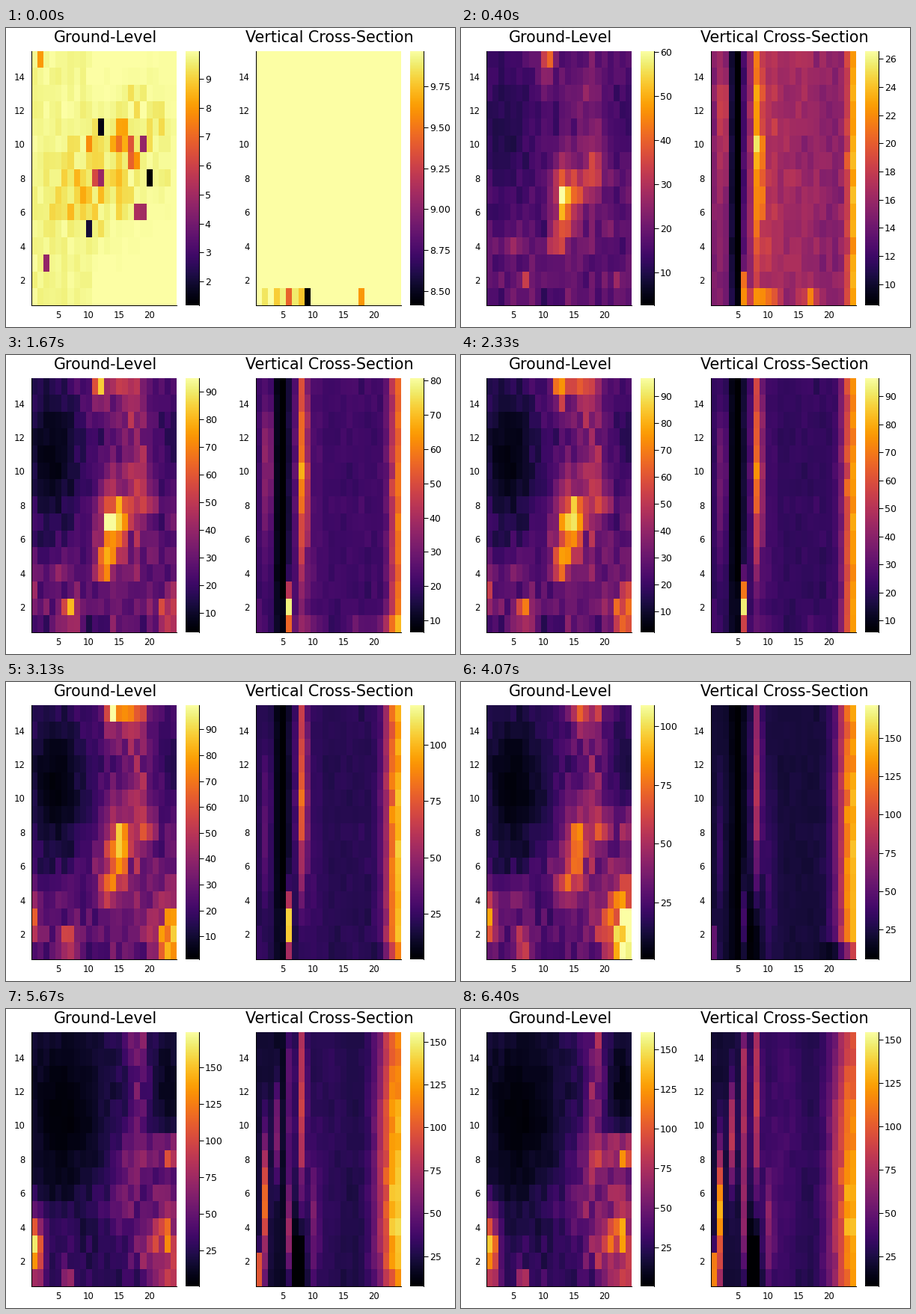
Write a matplotlib script that moves like this. It is 600 by 400 pixels and loops after 6470 ms.

```python
import numpy as np
import matplotlib.pyplot as plt
from matplotlib.animation import FuncAnimation

FRAMES, LOOP = 97, 6470
W, H = 600, 400
COLS, ROWS = 24, 15
KEYS = (13, 25, 47, 61, 74.5, 96)  # moments at which plume strengths are set
SPIN_UP = KEYS[0]

plt.rcParams["font.family"] = "DejaVu Sans"
gx, gy = np.meshgrid(np.arange(1, COLS + 1), np.arange(1, ROWS + 1))
rng = np.random.default_rng(4)


def plume(amps, start, end=None):
    """Gaussian (x, y, width, height) drifting from start to end."""
    start = np.array(start, float)
    end = start if end is None else np.array(end, float)

    def at(i):
        u = np.clip((i - KEYS[0]) / (KEYS[-1] - KEYS[0]), 0, 1)
        x, y, w, h = start + (end - start) * u
        return np.interp(i, KEYS, amps) * np.exp(-((gx - x) / w) ** 2 - ((gy - y) / h) ** 2)

    return at


def calm_ground():
    """Near-uniform start with a depleted band and a few sinks."""
    band = np.exp(-((gx - 14) / 8) ** 2 - ((gy - 6 - 0.2 * gx) / 2.6) ** 2)
    field = 9.95 - 1.3 * band * rng.gamma(1.5, 0.7, gx.shape)
    field -= 0.35 * rng.random(gx.shape) * (gx < 11)
    for x, y, v in ((12, 11, 1.5), (10, 5, 2), (20, 8, 1.2), (3, 3, 4.7),
                    (19, 10, 4.7), (18, 6, 5.2), (19, 6, 5), (11, 8, 6.2), (2, 15, 8)):
        field[y - 1, x - 1] = v
    return field


def calm_section():
    field = np.full(gx.shape, 9.967)
    for x, v in ((2, 9.86), (4, 9.78), (5, 9.9), (6, 9.42), (7, 9.88), (8, 9.76), (9, 8.41), (18, 9.61)):
        field[0, x - 1] = v
    return field


class Track:
    """Plumes on a flat background, growing out of a calm start."""

    def __init__(self, calm, base, grain, lows, highs, plumes):
        self.calm, self.base, self.grain = calm, base, grain
        self.lows, self.highs, self.plumes = lows, highs, plumes
        self.noise = rng.normal(0, 1, (2, ROWS, COLS))

    def at(self, i):
        times = (0,) + KEYS
        lo, hi = np.interp(i, times, self.lows), np.interp(i, times, self.highs)
        a = i / 40
        grain = self.grain * (np.cos(a) * self.noise[0] + np.sin(a) * self.noise[1])
        field = (self.base + sum(p(i) for p in self.plumes)) * np.exp(grain)
        u = min(i / SPIN_UP, 1)
        return np.clip(self.calm * (1 - u) + field * u, lo, hi), lo, hi


ground = Track(
    calm_ground(), 25, 0.17,
    (1.17, 4.1, 3, 1, 0.8, 0.3, 0.7),
    (9.97, 118.7, 95, 99.7, 109, 187.4, 160), [
        # clean air in the west and north-east
        plume((-15, -19, -22, -22, -22, -22), (3.5, 11, 5, 5), (6, 10.5, 8, 6)),
        plume((-8, -8, -10, -12, -14, -20), (23, 12, 3, 3)),
        # central plume, its tail and its northern branch
        plume((72, 58, 52, 48, 38, 30), (13.6, 6.9, 1.5, 1.7), (17, 7.6, 1.6, 2)),
        plume((42, 44, 28, 30, 20, 8), (11.8, 4.6, 1.2, 1), (15, 5, 2, 1.2)),
        plume((62, 38, 38, 42, 18, 40), (18.4, 8.2, 0.9, 1.3), (19.5, 8.4, 1.5, 0.9)),
        plume((14, 14, 12, 12, 10, 12), (15, 6.5, 4, 3.5), (16, 5.5, 5, 4)),
        plume((13, 15, 15, 14, 14, 38), (17.5, 11.5, 3, 4), (18.5, 12.5, 1.4, 4)),
        # northern edge, drifting east
        plume((52, 48, 55, 20, 45, 15), (10.5, 15, 1, 1), (19, 15, 1.2, 1.3)),
        plume((0, 25, 45, 28, 8, 0), (15, 15, 3, 0.9), (20, 15, 2, 0.7)),
        # inflow along the south, west and east edges
        plume((25, 50, 42, 45, 45, 45), (7, 1.8, 1.2, 1), (6.5, 1, 1.1, 0.7)),
        plume((15, 12, 8, 20, 28, 0), (5, 4, 3, 1)),
        plume((0, 10, 32, 55, 160, 128), (1, 2.8, 1, 0.8), (1.1, 2.6, 1.4, 2)),
        plume((6, 25, 52, 82, 68, 72), (25, 0.5, 3, 2), (22.5, 3, 3.6, 4)),
        plume((0, 0, 5, 30, 72, 105), (24, 8.5, 1, 0.6), (24, 8.4, 2.8, 0.8)),
    ])

section = Track(
    calm_section(), 21, 0.05,
    (8.413, 8.6, 6.5, 4.8, 5.5, 7, 7.8),
    (9.967, 45.95, 80.8, 119.3, 171.7, 156.8, 154.6), [
        plume((3, 0, 0, 2, 2, 18), (13, 8, 6, 30), (12.5, 9, 4, 14)),
        # clean lanes
        plume((-18, -18, -17, -17, -14, 0), (4.8, 9, 1.2, 20)),
        plume((0, 0, -10, -24, -28, -35), (7.6, 2, 1.1, 2.6)),
        # tall columns
        plume((18, 42, 58, 62, 70, 58), (8.3, 10, 0.9, 8), (8, 12, 0.7, 6)),
        plume((24, 65, 100, 25, 62, 25), (6, 1.5, 0.6, 1), (6, 4, 0.6, 2.6)),
        plume((0, 0, 0, 0, 0, 55), (6, 11, 0.6, 7)),
        plume((10, 22, 18, 15, 62, 105), (2.5, 11, 0.8, 4), (2, 4.6, 0.5, 3.8)),
        plume((0, 0, 0, 5, 24, 68), (4, 9.5, 0.6, 3)),
        plume((3, 3, 5, 14, 22, 34), (10.5, 7, 1, 9), (10, 4, 0.9, 3)),
        # sources near the floor
        plume((0, 5, 5, 40, 80, 120), (1, 1.5, 0.6, 1)),
        plume((12, 8, 0, 0, 0, 0), (9, 1, 2, 0.5)),
        plume((8, 5, 0, 0, 0, 0), (17, 1, 1.3, 0.5)),
        # eastern wall, widening
        plume((17, 36, 82, 125, 130, 108), (24, 9, 1.1, 40), (24.4, 5, 4, 15)),
        plume((0, 14, -15, -50, -32, 0), (23, 1, 3, 0.5)),
    ])

fig = plt.figure(figsize=(W / 100, H / 100), dpi=100, facecolor="white")


def box(x0, x1, sides):
    ax = fig.add_axes([x0 / W, (H - 371) / H, (x1 - x0) / W, 340.4 / H])
    for name, spine in ax.spines.items():
        spine.set_visible(name in sides)
        spine.set_linewidth(0.75)
    return ax


def tick_step(span):
    for limit, step in ((2, 0.25), (10, 1), (20, 2), (45, 5), (105, 10), (220, 25)):
        if span < limit:
            return step
    return 50


class Panel:
    def __init__(self, x, title, track):
        self.track = track
        ax = box(x, x + 193.5, ("left", "bottom"))
        self.im = ax.imshow(track.calm, cmap="inferno", origin="lower", aspect="auto",
                            interpolation="nearest", extent=(0.5, COLS + 0.5, 0.5, ROWS + 0.5))
        ax.set_xticks(range(5, 21, 5))
        ax.set_yticks(range(2, 15, 2))
        ax.tick_params(length=0, labelsize=8.4)
        ax.tick_params(axis="x", pad=5.1)
        ax.tick_params(axis="y", pad=6)
        fig.text((x + 98.8) / W, (H - 18.8) / H, title, fontsize=14.9, ha="center", va="baseline")

        self.bar = box(x + 206, x + 223.5, ("right",))
        self.ramp = self.bar.imshow(np.linspace(0, 1, 256)[:, None], cmap="inferno",
                                    origin="lower", aspect="auto", interpolation="nearest")
        self.bar.set_xticks([])
        self.bar.yaxis.tick_right()
        self.bar.tick_params(axis="y", length=4.4, width=0.75, pad=1.6, labelsize=9)

    def show(self, i):
        data, lo, hi = self.track.at(i)
        self.im.set_data(data)
        self.im.set_clim(lo, hi)
        self.ramp.set_extent((0, 1, lo, hi))
        self.bar.set_ylim(lo, hi)
        step = tick_step(hi - lo)
        ticks = np.arange(np.ceil(lo / step), np.floor(hi / step) + 1) * step
        self.bar.set_yticks(ticks, [f"{t:.2f}" if step < 1 else f"{t:.0f}" for t in ticks])


panels = [Panel(34, "Ground-Level", ground),
          Panel(334, "Vertical Cross-Section", section)]


def draw(i):
    for p in panels:
        p.show(i)
    return []


anim = FuncAnimation(fig, draw, frames=FRAMES, interval=LOOP / FRAMES,
                     repeat=True, repeat_delay=0, blit=False)
plt.show()
```
